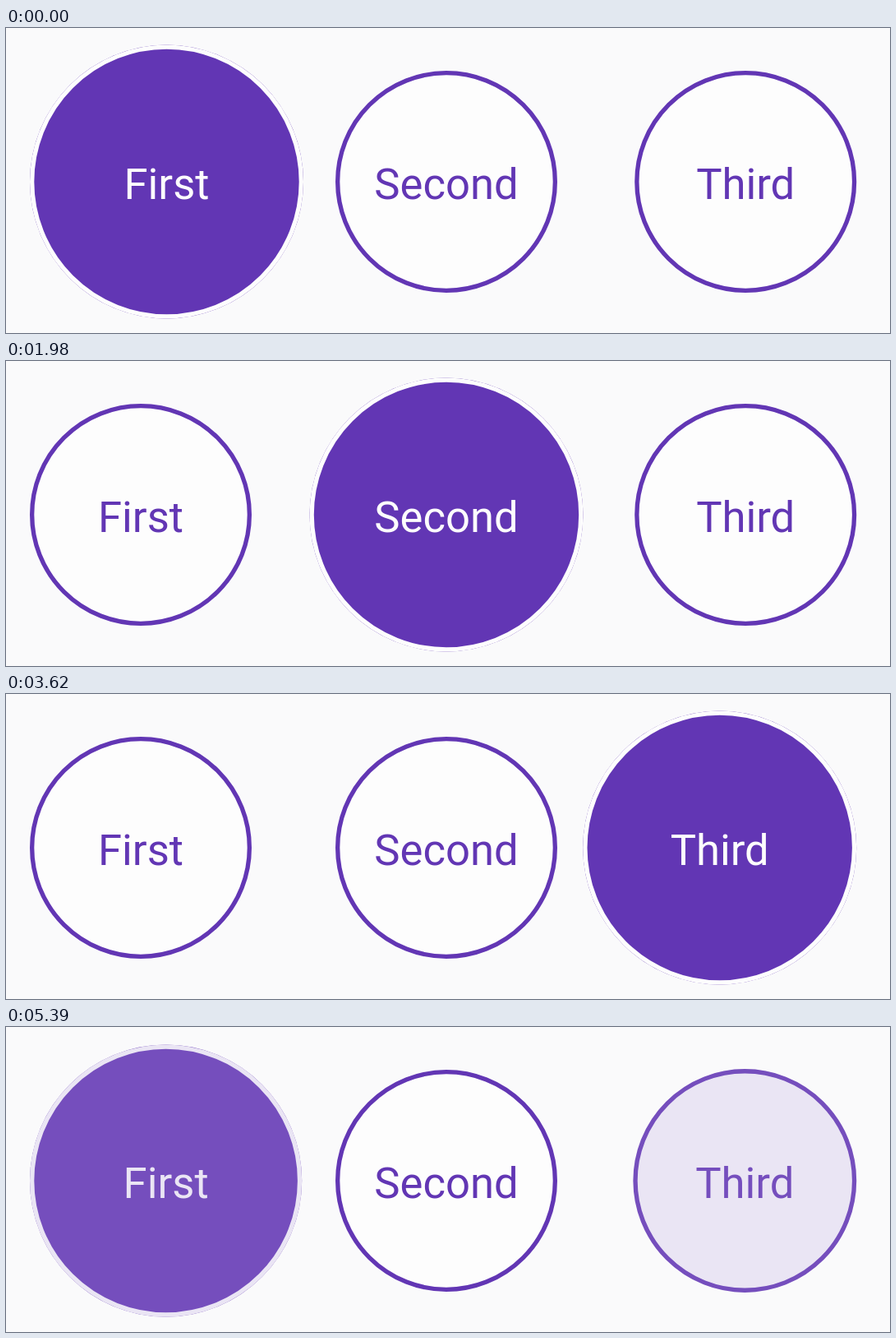
Recreate the animation shown at these times as an HTML page. Size 1076 by 371 pixels, loop 5.43 s.

```html
<!DOCTYPE html>
<html lang="en">
<head>
<meta charset="utf-8">
<title>Circle selector</title>
<style>
  html, body { margin: 0; width: 100%; height: 100%; overflow: hidden; background: #fafafb; }
  svg { display: block; }
  text { font: 52.6px Roboto, sans-serif; text-anchor: middle; }
</style>
</head>
<body>
<svg id="stage" width="1076" height="371" viewBox="0 0 1076 371"></svg>
<script>
const LOOP = 5430, DURATION = 600, CY = 187;
const SMALL = 135, LARGE = 166.5, BORDER = 5.3;
const PURPLE = [98, 54, 180], WHITE = [253, 253, 253];

// Selection moves: start time, old index, new index
const moves = [[1064, 0, 1], [3012, 1, 2], [4863, 2, 0]];

const stage = document.getElementById('stage');

function add(tag, attrs) {
  const node = document.createElementNS('http://www.w3.org/2000/svg', tag);
  set(node, attrs);
  stage.append(node);
  return node;
}

function set(node, attrs) {
  for (const name in attrs) node.setAttribute(name, attrs[name]);
}

const items = [
  ['First', r => 29 + r],
  ['Second', () => 536],
  ['Third', r => 1035.2 - r]
].map(([name, centre]) => {
  const disc = add('circle', { cy: CY });
  const ring = add('circle', { cy: CY, fill: 'none', 'stroke-width': BORDER });
  const label = add('text', { y: 207.5 });
  label.textContent = name;
  return { disc, ring, label, centre };
});

const ease = p => p < 0.5 ? 2 * p * p : 1 - 2 * (1 - p) ** 2;

const colour = white =>
  `rgb(${PURPLE.map((c, i) => Math.round(c + (WHITE[i] - c) * white))})`;

// How far each circle is selected, 0 to 1, before easing
function selection(t) {
  const levels = [1, 0, 0];
  for (const [start, from, to] of moves) {
    if (t < start) break;
    const p = Math.min(1, (t - start) / DURATION);
    levels[from] = 1 - p;
    levels[to] = p;
  }
  return levels;
}

function draw(now) {
  const levels = selection(now % LOOP);
  items.forEach(({ disc, ring, label, centre }, i) => {
    const level = levels[i];
    const r = SMALL + (LARGE - SMALL) * ease(level);
    const cx = centre(r), ink = colour(level);
    set(disc, { cx, r, fill: colour(1 - level) });
    set(ring, { cx, r: r - BORDER / 2, stroke: ink });
    set(label, { x: cx, fill: ink });
  });
}

const begin = performance.now();
function tick() {
  draw(performance.now() - begin);
  requestAnimationFrame(tick);
}
tick();
</script>
</body>
</html>
```
